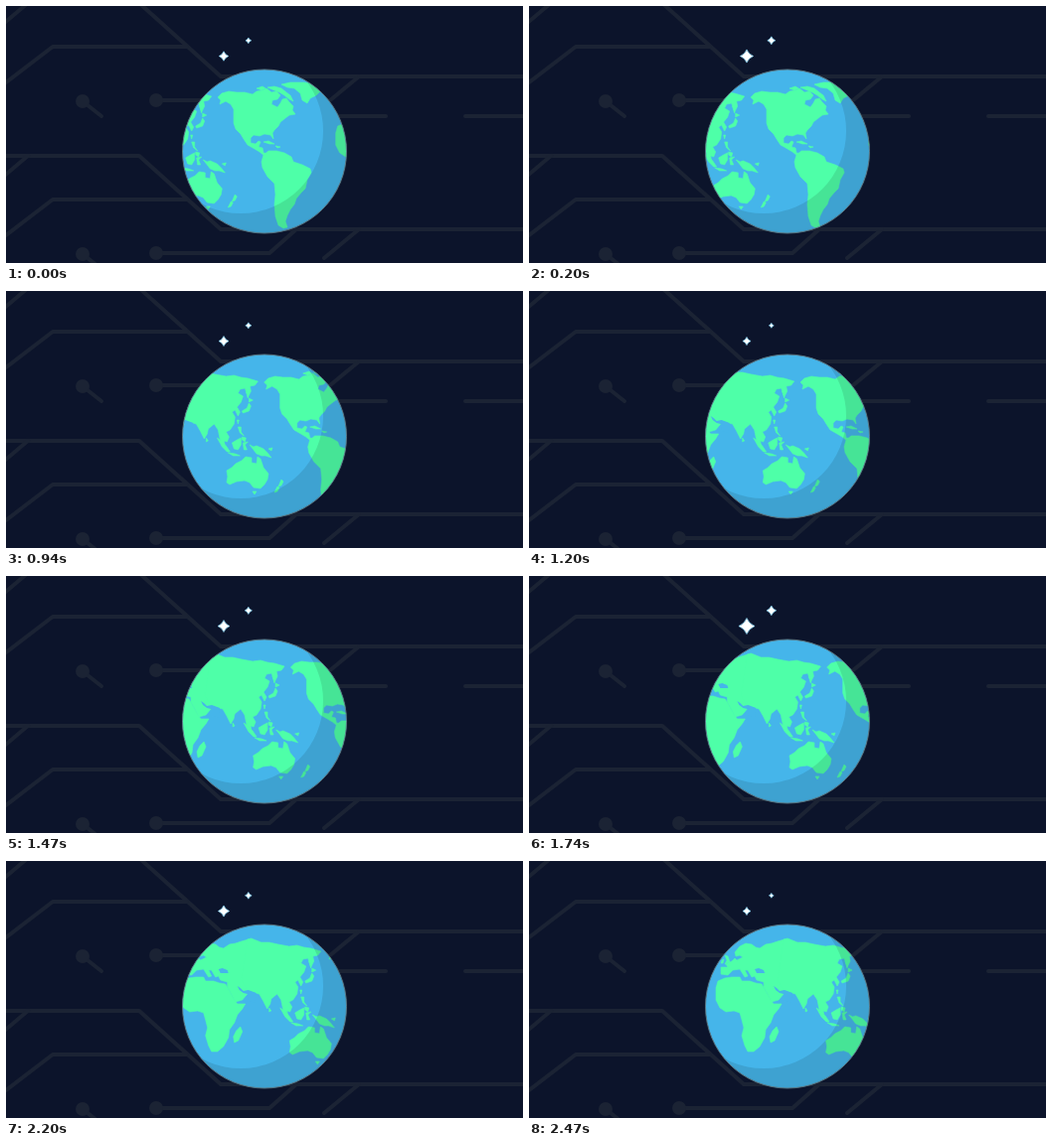
Recreate the animation shown at these times as an HTML page. Size 520 px wide and 259 px high, loop 2.54 s.

```html
<!DOCTYPE html>
<html lang="en">
<head>
<meta charset="utf-8">
<title>Spinning globe</title>
<style>
  html, body { margin: 0; width: 100%; height: 100%; overflow: hidden; background: #0c142b; }
  svg { display: block; width: 100%; height: 100%; }
  .wire { fill: none; stroke: #1b2334; stroke-width: 4; stroke-linejoin: round; stroke-linecap: round; }
  .dot { fill: #1b2334; }
  .land { fill: #4effa8; stroke: #4effa8; stroke-width: .6; stroke-linejoin: round; }
  .sea { fill: #45b5ea; stroke: none; }
  .star { fill: #fff; stroke: #7cc4e4; stroke-width: .8; vector-effect: non-scaling-stroke; }
</style>
</head>
<body>
<svg viewBox="0 0 520 259">
  <defs>
    <clipPath id="ball"><circle cx="260" cy="146.5" r="82.5"/></clipPath>
    <g id="circuit">
      <g class="wire">
        <path d="M-4-3H134L216 71H524"/>
        <path d="M22-3L-4 19"/>
        <path d="M-4 80L47 41H182"/>
        <path d="M77 96L96 111"/>
        <path d="M151 95H265L292 71"/>
        <path d="M355 71L320 100"/>
        <path d="M320 111H382M462 111H524"/>
      </g>
      <circle class="dot" cx="77" cy="96" r="7"/>
      <circle class="dot" cx="151" cy="95" r="7"/>
    </g>
    <g id="world">
      <!-- Americas -->
      <path d="M213 92L217 88L224 86L232 87L240 87L248 89L252 86L258 85L262 83L267 87L272 86L276 90L273 94L268 95L267 99L273 102L276 98L278 94L282 93L285 97L289 101L288 105L291 109L285 110L281 113L276 117L274 121L270 125L268 128L269 134L266 130L260 129L255 131L249 130L246 133L246 138L251 139L254 136L256 137L254 142L258 143L259 148L264 149L260 151L255 147L250 144L243 140L239 134L236 129L231 124L229 118L229 110L229 104L226 99L221 96L215 99L216 95Z"/>
      <path d="M252 83L258 81L261 83L257 85ZM263 82L270 81L277 83L282 87L286 90L289 96L285 94L280 90L275 87L270 85Z"/>
      <path d="M277 79L286 77L300 77L311 79L317 85L312 90L306 93L303 98L298 95L296 88L290 83L283 82Z"/>
      <path d="M259 137L264 136L270 139L265 139ZM271 141L276 142L273 143Z"/>
      <path d="M259 150L264 146L272 146L280 148L287 152L289 157L298 160L306 164L307 168L303 175L301 184L297 188L292 194L290 200L286 205L283 211L281 217L283 223L279 224L274 221L271 212L270 200L271 190L270 179L263 172L258 163L257 157Z"/>
      <!-- Oceania -->
      <g transform="translate(-46.7)">
        <path d="M222 181L227 178L231 174L237 171L241 167L247 168L247 173L252 174L253 167L256 169L259 178L264 184L263 190L260 195L256 199L249 198L245 193L240 191L232 192L225 195L222 193L223 187Z"/>
        <path d="M248 202L252 202L250 205ZM277 190L279 192L277 196L274 197ZM273 197L275 198L273 202L270 203Z"/>
        <path d="M245 155L249 157L252 156L259 159L263 163L267 168L261 166L257 166L252 164L249 160ZM264 159L268 158L267 161Z"/>
      </g>
      <!-- Old World -->
      <g transform="translate(-123.3)">
        <path d="M190 121L197 118L204 117L212 117L214 121L222 121L228 123L234 124L238 131L243 140L246 144L254 144L251 149L246 155L243 163L238 170L237 178L232 187L226 192L220 192L217 186L214 176L216 168L214 160L212 153L206 151L198 152L192 148L188 140L188 128Z"/>
        <path d="M249 167L251 172L247 181L243 183L242 177L245 171Z"/>
        <path d="M197 95L200 96L202 102L197 104L199 100ZM194 100L196 99L195 103L193 103Z"/>
        <path d="M193 114L193 107L200 107L198 104L204 101L207 98L209 100L215 97L212 95L208 96L207 92L212 86L218 83L224 84L228 87L232 88L238 84L244 83L250 81L257 79L262 80L262 141L256 134L251 140L244 142L240 134L236 127L236 122L229 120L227 116L224 117L220 110L217 110L220 116L217 117L212 109L205 110L200 115Z"/>
        <path d="M256 79L260 78L270 82L278 82L287 84L298 86L306 85L313 87L320 88L330 91L327 95L322 96L323 101L320 107L317 98L312 99L310 103L315 106L313 112L309 117L312 122L310 126L307 120L304 122L307 127L306 134L302 140L298 142L301 147L299 152L296 151L297 157L294 156L292 150L290 140L286 134L280 139L279 144L276 149L272 141L268 134L264 133L256 131L250 120Z"/>
        <path class="sea" d="M227 109L231 108L236 110L237 113L229 113ZM246 126L249 128L252 131L257 130L265 133L264 143L257 141L256 134L252 133L248 130Z"/>
        <path d="M289 148L293 151L298 156L302 162L299 162L294 157ZM300 163L307 164L312 166L305 166ZM304 153L309 150L313 148L313 155L310 160L306 159ZM315 153L320 152L317 155L319 160L316 160ZM278 148L280 151L278 152Z"/>
        <path d="M310 137L313 137L313 142L316 146L312 143ZM314 147L318 148L317 152L314 150ZM309 130L311 130L310 134ZM321 108L325 110L321 112ZM321 113L323 116L321 121L315 123L314 121L319 118ZM318 101L320 104L320 108Z"/>
      </g>
    </g>
  </defs>

  <rect width="520" height="259" fill="#0c142b"/>
  <use href="#circuit"/>
  <use href="#circuit" y="154"/>

  <g clip-path="url(#ball)">
    <circle cx="260" cy="146.5" r="83" fill="#45b5ea"/>
    <g id="map" class="land">
      <use href="#world"/>
      <use href="#world" x="267"/>
    </g>
    <path fill="#000" fill-opacity=".105" fill-rule="evenodd" d="M170 40H350V240H170ZM153 126a83 83 0 1 0 166 0a83 83 0 1 0-166 0Z"/>
  </g>
  <circle cx="260" cy="146.5" r="82.5" fill="none" stroke="#587480" stroke-width="1"/>

  <path id="big" class="star"/>
  <path id="small" class="star"/>
</svg>
<script>
  const LOOP = 2540, STEP = 10 / 3;
  const $ = id => document.getElementById(id);
  const map = $("map"), big = $("big"), small = $("small");

  // Four-pointed sparkle with slightly hollow sides
  function sparkle(x, y, r) {
    const q = r * 0.29;
    return `M${x} ${y - r}Q${x + q} ${y - q} ${x + r} ${y}Q${x + q} ${y + q} ${x} ${y + r}` +
           `Q${x - q} ${y + q} ${x - r} ${y}Q${x - q} ${y - q} ${x} ${y - r}Z`;
  }

  function draw(ms) {
    // 15 pictures per second on a 10 ms clock
    const k = Math.floor(Math.floor((ms % LOOP) / 10) * 3 / 20);
    const t = k / 15;
    const r = 6.1 + 2.1 * Math.cos(2 * Math.PI * (t - 0.48) / (4 / 3));
    map.setAttribute("transform", `translate(${k * STEP})`);
    big.setAttribute("d", sparkle(219, 50.5, r));
    small.setAttribute("d", sparkle(243.8, 34.8, r * 0.6));
  }

  const start = performance.now();
  function tick() {
    draw(performance.now() - start);
    requestAnimationFrame(tick);
  }
  draw(0);
  requestAnimationFrame(tick);
</script>
</body>
</html>
```
